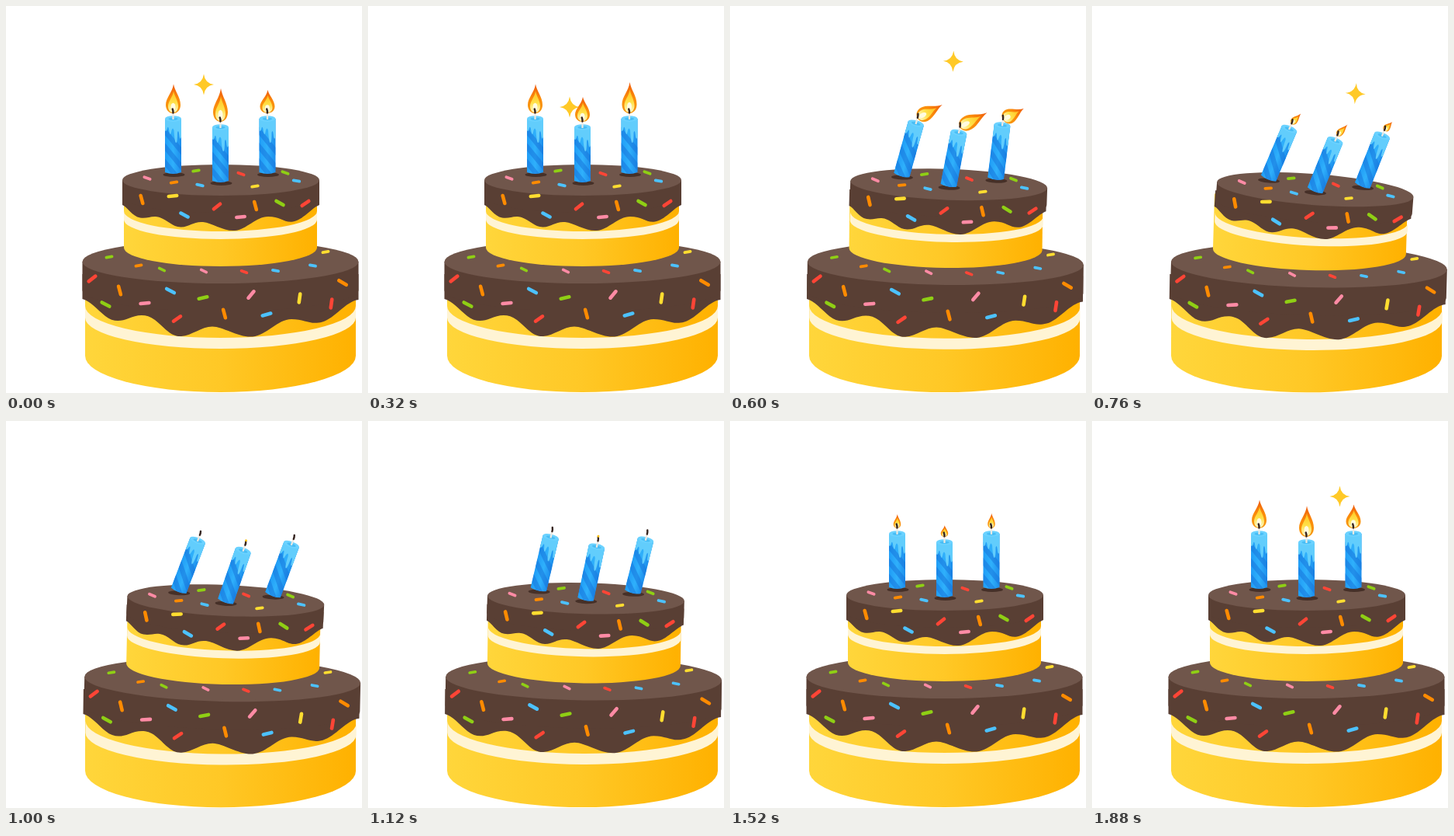
An HTML page that plays this animation: 459 px wide and 498 px high, repeating every 1920 ms.

```html
<!DOCTYPE html>
<html lang="en">
<head>
<meta charset="utf-8">
<title>Birthday cake</title>
<style>
html, body { margin: 0; width: 100%; height: 100%; overflow: hidden; background: #fff; }
svg { display: block; width: 100%; height: 100%; }
</style>
</head>
<body>
<svg viewBox="0 0 459 498">
  <defs>
    <linearGradient id="sponge">
      <stop offset="0" stop-color="#ffd63b"/>
      <stop offset=".5" stop-color="#ffc826"/>
      <stop offset="1" stop-color="#ffb100"/>
    </linearGradient>
    <linearGradient id="fire" x1="0" y1="0" x2="0" y2="1">
      <stop offset="0" stop-color="#ee5a0c"/>
      <stop offset=".5" stop-color="#fb8c0a"/>
      <stop offset="1" stop-color="#f59a12"/>
    </linearGradient>
    <linearGradient id="glow" x1="0" y1="0" x2="0" y2="1">
      <stop offset="0" stop-color="#ffc21c"/>
      <stop offset=".55" stop-color="#ffe14a"/>
      <stop offset="1" stop-color="#fff9c8"/>
    </linearGradient>
    <linearGradient id="wax">
      <stop offset="0" stop-color="#1f9cf6"/>
      <stop offset=".5" stop-color="#2fb0fb"/>
      <stop offset="1" stop-color="#1c8ceb"/>
    </linearGradient>
    <clipPath id="stick"><path d="M-10.5-70V-1Q0 3 10.5-1V-70Z"/></clipPath>
    <g id="candle">
      <g clip-path="url(#stick)">
        <path fill="url(#wax)" d="M-11-72H11V4H-11Z"/>
        <path fill="none" stroke="#1672da" stroke-width="6.5" stroke-opacity=".5"
          d="M-14-58 14-24M-14-38 14-4M-14-18 14 16"/>
        <path fill="#62cdfc" d="M-11-72V-56Q-9-51-7.500-58Q-6-62-5-53Q-3.500-46-2-55Q-.5-60 1-55Q2-38 4-39Q5.500-40 5.500-52Q7-58 8-47Q9-41 11-48V-72Z"/>
      </g>
      <ellipse cy="-70" rx="10.500" ry="3.800" fill="#6bd2ff"/>
      <ellipse cy="-69.700" rx="6" ry="1.800" fill="#48bdf5"/>
      <path d="M0-69V-77" stroke="#eee9e2" stroke-width="2.200"/>
    </g>
    <g id="flame">
      <path fill="url(#fire)" d="M.5-38C2-29 9.500-21 9.500-11C9.500-4 5 0 0 0S-9.500-4-9.500-11C-9.500-20-1-27 .5-38Z"/>
      <path fill="url(#glow)" d="M.5-29C2-22 6.500-16 6.500-9.500C6.500-4 3.500-1 0-1S-6.500-4-6.500-9.500C-6.500-16-.5-21 .5-29Z"/>
      <ellipse cy="-8" rx="3" ry="5.500" fill="#fffbe0"/>
    </g>
  </defs>
  <path id="lowerSponge" fill="url(#sponge)" d="M102 365V450A174.500 47 0 0 0 451 450V365Z"/>
  <path id="lowerCream" fill="#fff4d4" d="M102 386A174.500 41 0 0 0 451 386V401A174.500 40 0 0 1 102 401Z"/>
  <path id="lowerDrips" fill="#593f34" d="M98.500 345V377C108 379 118 391 128 399S148 406 158 402S180 395 192 404S212 426 226 425S252 412.500 266 412.500S300 427 318 425.500S350 403 368 403S392 411 408 406.500S438 380 454.500 378V345Z"/>
  <g id="lowerTop">
    <path fill="#593f34" d="M98.500 329V366A178 27 0 0 0 454.500 366V329Z"/>
    <ellipse cx="276.500" cy="329" rx="178" ry="28" fill="#70564b"/>
  </g>
  <path id="upperSponge" fill="url(#sponge)" d="M152 240V311A124.500 24 0 0 0 401 311V240Z"/>
  <path id="upperCream" fill="#fff4d4" d="M152 264A124.500 26 0 0 0 401 264V275A124.500 25 0 0 1 152 275Z"/>
  <path id="upperDrips" fill="#593f34" d="M150 235V256C156 258 163 271 173 272.500S188 269 198 272S215 285 226 284.500S242 277 254 278S280 290 295 289S322 271 338 271S358 279 370 277.500S394 260 404 256V235Z"/>
  <g id="upperTop">
    <path fill="#593f34" d="M150 224V246A127 20 0 0 0 404 246V224Z"/>
    <ellipse cx="277" cy="224" rx="127" ry="20" fill="#70564b"/>
  </g>
</svg>
<script>
const LOOP = 1920, STEP = 40;
const $ = id => document.getElementById(id);

function add(parent, tag, attrs) {
  const el = document.createElementNS('http://www.w3.org/2000/svg', tag);
  for (const k in attrs) el.setAttribute(k, attrs[k]);
  return parent.appendChild(el);
}
const move = (el, value) => el.setAttribute('transform', value);

const COLORS = { p: '#ff8ba5', g: '#8fcf14', o: '#ff8b00', r: '#ff4536', b: '#4cc2ff', y: '#ffdd30' };

// Each sprinkle: x, y, angle, colour
function sprinkle(parent, list, length, width) {
  for (const [x, y, angle, color] of list) {
    const half = (length - width) / 2;
    add(parent, 'path', {
      d: `M${-half} 0H${half}`, stroke: COLORS[color], 'stroke-width': width,
      'stroke-linecap': 'round', transform: `translate(${x} ${y}) rotate(${angle})`
    });
  }
}
sprinkle($('lowerTop'), [
  [133, 323, -10, 'g'], [171, 334, -10, 'o'], [201, 339, 25, 'g'], [255, 341, 25, 'p'],
  [307, 342, 20, 'r'], [347.5, 340.5, 10, 'b'], [395.5, 334, 10, 'b'], [412, 316.5, -10, 'y']
], 11, 3.6);
sprinkle($('lowerTop'), [
  [111, 351, -38, 'r'], [146.5, 366, 75, 'o'], [128.5, 384, 28, 'g'], [179, 382.5, -5, 'p'],
  [212, 366.5, 28, 'b'], [220.5, 402.5, -35, 'r'], [254, 375.5, -12, 'g'], [281.5, 396, 75, 'o'],
  [316, 371.5, -50, 'p'], [336, 397, -15, 'b'], [378.5, 376, -82, 'y'], [419.5, 383, -82, 'r'],
  [434, 356, 30, 'o']
], 15.5, 4.6);
sprinkle($('upperTop'), [
  [182, 221.5, 20, 'p'], [245, 212, -10, 'g'], [216.5, 227, -8, 'o'], [250, 230.5, 12, 'b'],
  [303, 216, 20, 'r'], [321, 232, -10, 'y'], [360, 214.5, 20, 'g'], [374.5, 225, 10, 'b']
], 11.5, 3.8);
sprinkle($('upperTop'), [
  [175, 249, 75, 'o'], [215, 244.5, -5, 'y'], [230, 269, 28, 'b'], [272, 258, -38, 'r'],
  [302.5, 271.5, -5, 'p'], [321.5, 257, 75, 'o'], [353, 253.5, 30, 'g'], [386, 254, -35, 'r']
], 15, 4.6);

// Smooth curve through [time, value] points, without overshoot
function curve(points) {
  const slope = i => (points[i + 1][1] - points[i][1]) / (points[i + 1][0] - points[i][0]);
  const last = points.length - 1;
  const tangents = points.map((p, i) => {
    if (i === 0 || i === last) return 0;
    const a = slope(i - 1), b = slope(i);
    return a * b > 0 ? 2 * a * b / (a + b) : 0;
  });
  return t => {
    if (t <= points[0][0]) return points[0][1];
    if (t >= points[last][0]) return points[last][1];
    const i = points.findIndex(p => p[0] > t) - 1;
    const [t0, v0] = points[i], [t1, v1] = points[i + 1];
    const d = t1 - t0, u = (t - t0) / d, w = 1 - u;
    return v0 * (1 + 2 * u) * w * w + v1 * u * u * (3 - 2 * u)
      + d * u * w * (tangents[i] * w - tangents[i + 1] * u);
  };
}

const lowerTilt = curve([[400, 0], [600, .65], [760, 1.65], [840, 1.75], [1000, 1.3], [1280, .2], [1440, 0]]);
const upperTilt = curve([[360, 0], [600, 2.05], [760, 4.35], [820, 4.5], [1000, 2.5], [1280, .5], [1400, 0]]);
const flameTilt = curve([[380, 0], [600, 61], [760, 42], [840, 40], [1300, 0]]);
const flameSize = curve([[600, 1], [760, .46], [840, 0], [1400, 0], [1640, 1]]);
const wave = (t, period) => 2 * Math.PI * t / period;

// The cake bends: each layer takes a share of the lower and the upper tilt
const layers = {
  lowerSponge: [.05, 0], lowerCream: [.4, 0], lowerDrips: [.6, 0], lowerTop: [1, 0],
  upperSponge: [1, 0], upperCream: [.5, .5], upperDrips: [.3, .7], upperTop: [0, 1]
};

const stars = [
  { x: 255, y: 101, from: -80, to: 200 },
  { x: 260, y: 130, from: 200, to: 440 },
  { x: 277, y: 65.5, from: 440, to: 690 },
  { x: 319.5, y: 97, from: 690, to: 860 },
  { x: 319.5, y: 97, from: 1600, to: 2000 }
];
for (const s of stars) {
  s.el = add($('upperTop'), 'path', {
    fill: '#ffc927', d: 'M0-13.5Q1.5-1.5 13 0Q1.5 1.5 0 13.5Q-1.5 1.5-13 0Q-1.5-1.5 0-13.5Z'
  });
}

const candles = [
  {
    x: 215.5, y: 215, lean: curve([[360, 0], [600, 13.5], [760, 18.6], [1000, 18.4], [1280, .6], [1360, 0]]),
    height: t => 37.5 + 1.5 * Math.sin(wave(t, 320))
  },
  {
    x: 337, y: 215, lean: curve([[440, 0], [600, 5], [760, 17.4], [1000, 18], [1280, 2], [1400, 0]]),
    height: t => 35 - 5 * Math.cos(wave(t, 640))
  },
  {
    x: 276.5, y: 226, ember: true, lean: curve([[400, 0], [600, 9], [760, 17.8], [1000, 16.8], [1280, .6], [1360, 0]]),
    height: t => 37.5 + 5.5 * Math.cos(wave(t, 640)) + 4 * Math.sin(wave(t, 320))
  }
];
for (const c of candles) {
  add($('upperTop'), 'ellipse', { cx: c.x + 1, cy: c.y + 2, rx: 14, ry: 3, fill: '#463028' });
  c.el = add($('upperTop'), 'g', {});
  add(c.el, 'use', { href: '#candle' });
  c.flame = add(c.el, 'use', { href: '#flame' });
  add(c.el, 'path', {
    d: 'M0-77.5Q.2-80-.8-82.5', fill: 'none', stroke: '#35241f', 'stroke-width': 2.4, 'stroke-linecap': 'round'
  });
  if (c.ember) c.spark = add(c.el, 'circle', { cx: -.8, cy: -83.5, r: 1.5, fill: '#ffc51c' });
}

function draw(t) {
  const low = lowerTilt(t), up = upperTilt(t), size = flameSize(t);
  for (const id in layers) {
    const [a, b] = layers[id];
    move($(id), `rotate(${low * a} 105 450) rotate(${up * b} 122 372)`);
  }
  for (const c of candles) {
    const lean = c.lean(t);
    move(c.el, `translate(${c.x} ${c.y}) rotate(${lean})`);
    move(c.flame, `translate(0 -77) rotate(${flameTilt(t) - lean - up}) scale(${size} ${size * c.height(t) / 38})`);
    c.flame.style.display = size > .02 ? '' : 'none';
    if (c.spark) c.spark.style.display = size > .02 ? 'none' : '';
  }
  for (const s of stars) {
    const on = t >= s.from && t < s.to;
    s.el.style.display = on ? '' : 'none';
    if (on) move(s.el, `translate(${s.x} ${s.y}) scale(${Math.min(1, (t - s.from + 40) / 80, (s.to - t) / 80)})`);
  }
}

const start = performance.now();
function tick() {
  const t = (performance.now() - start) % LOOP;
  draw(Math.floor(t / STEP) * STEP);
  requestAnimationFrame(tick);
}
tick();
</script>
</body>
</html>
```
